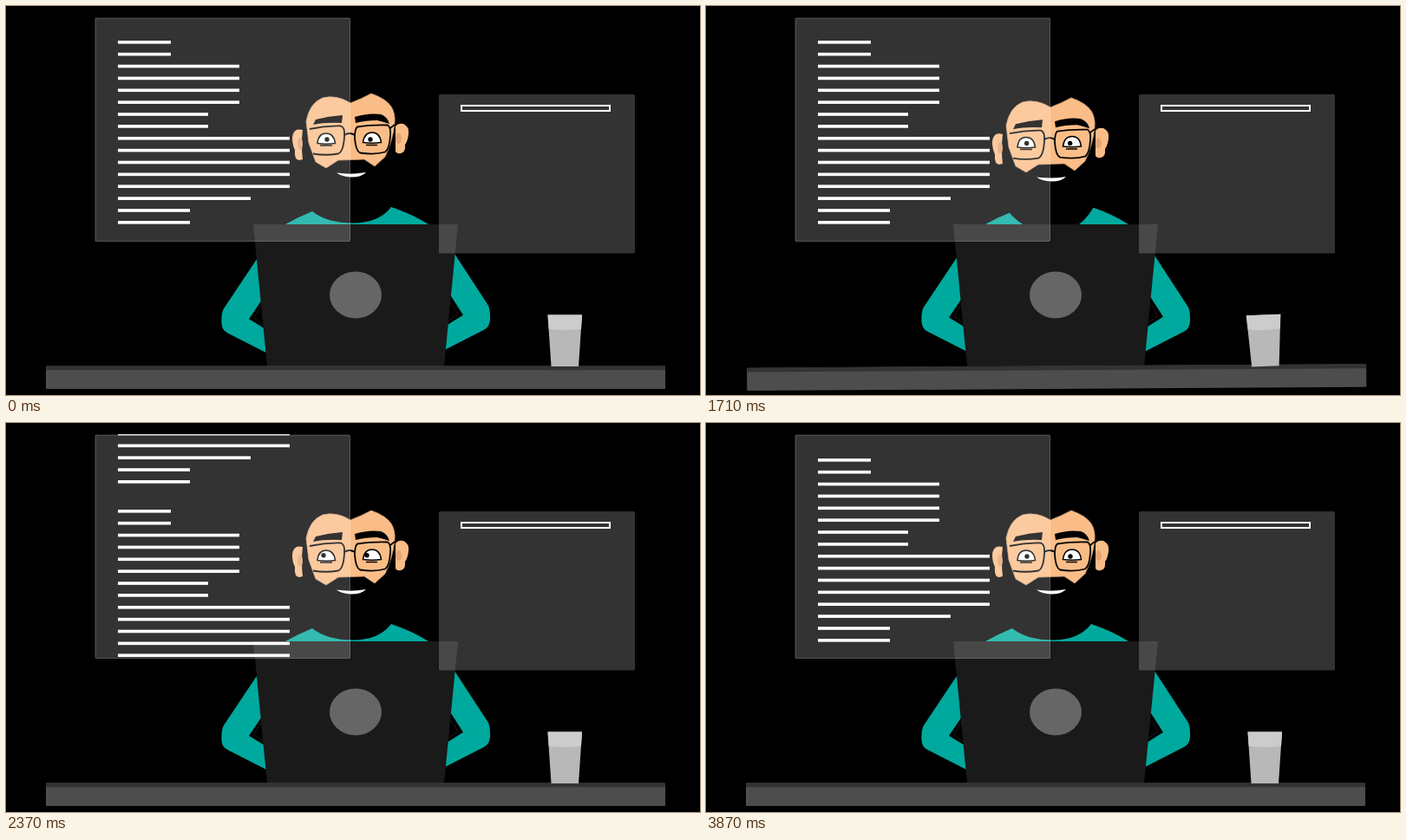
An HTML page that plays this animation: 800x449 px, repeating every 4.14 s.

```html
<!DOCTYPE html>
<html lang="en">
<head>
<meta charset="utf-8">
<title>Developer at work</title>
<style>
  html, body { margin: 0; width: 100%; height: 100%; overflow: hidden; background: #000; }
  svg { display: block; width: 100%; height: 100%; }
</style>
</head>
<body>
<svg viewBox="0 0 800 449">
  <defs>
    <clipPath id="codeClip"><rect x="102" y="13" width="295" height="259.5"/></clipPath>
  </defs>

  <path id="shirt" fill="#00a99d"/>

  <g id="leftArm">
    <path fill="#00a99d" d="M293 286L251 349Q248 354 248.500 366Q249 374 255 377L303 401.500V375L280 361L299 333Z"/>
    <path fill="none" stroke="#1a1a1a" d="M294 346L286 360L298 368"/>
  </g>
  <g id="rightArm">
    <path fill="#00a99d" d="M515 283L556 346Q558.500 352 558 363Q557 371 551 374L503 398.500V372L527 357L511 332Z"/>
    <path fill="none" stroke="#1a1a1a" d="M513 343L521 356L508 365"/>
  </g>

  <g id="head">
    <g fill="#fbbd87">
      <path d="M342 143Q331 140 330 152Q330 160 333 166Q332 178 338 178L342 177Q340 160 342 143Z"/>
      <path d="M449 139Q452 135 458 136Q465 139 464 148Q463 156 460 160Q461 169 455 170Q451 171 449 168Z"/>
      <path stroke="#c79a75" stroke-width=".8" d="M346 133Q350 112 365 106Q381 102 397 112Q410 107 421 101Q438 107 444 116Q449 124 448 135Q446 155 437 174L425 185L413 177L383 178L369 187L357 180L349 158Z"/>
    </g>
    <ellipse cx="339" cy="159" rx="3" ry="7" fill="#e5a474"/>
    <ellipse cx="452.500" cy="153" rx="3.500" ry="6" fill="#e5a474"/>
    <path fill="#fff" d="M381 192.500Q398 195 415 192Q410 197.500 398 197.500Q387 197 381 192.500Z"/>
  </g>

  <g id="glasses">
    <path d="M354 137L357 131Q372 127 388 126L387 135Q368 134 354 137Z"/>
    <path d="M402 128Q418 123 432 125Q440 128 442 136Q433 133 428 132Q414 132 403 135Z"/>
    <g fill="none" stroke="#000" stroke-width="1.800">
      <path d="M350 142Q368 138 386 138.500Q391 140 390 151Q389 168 383 170.500Q368 173 354 170.500"/>
      <path d="M405 139.500Q402 142 402 152Q403 167 408 169.500Q425 172 437 168.500Q442 165 443 150Q444 140 440 137.500Q420 137 405 139.500Z"/>
      <path d="M390 149Q396 145 402 149M443 141L448 137"/>
    </g>
  </g>

  <g id="eyes">
    <g fill="#fff" stroke="#000" stroke-width="1.500">
      <path d="M359 158.500Q360 147 369 147Q378 147 379.500 158.500Q369 160 359 158.500Z"/>
      <path d="M411.500 157.500Q413 146 422 146Q431 146 432.500 157.500Q422 159 411.500 157.500Z"/>
      <path d="M362 161H376M415 160.500H428"/>
    </g>
    <circle id="leftPupil" cy="154" r="2.700"/>
    <circle id="rightPupil" cy="154" r="2.700"/>
  </g>

  <path fill="#1a1a1a" d="M285 252H521L505 416H301Z"/>
  <ellipse cx="403" cy="333.500" rx="30" ry="27" fill="#666"/>

  <g id="desk">
    <rect x="46" y="415.500" width="714" height="26.500" rx="1" fill="#4d4d4d"/>
    <rect x="46" y="415.500" width="714" height="4.800" rx="1" fill="#333"/>
  </g>
  <g id="glass">
    <path fill="#b8b8b8" d="M624.500 356.500H664L660 416H628.500Z"/>
    <path fill="#ccc" d="M624.500 356.500H664L663 373Q644 375 625.700 373Z"/>
  </g>

  <g fill="#fff">
    <rect x="103" y="14" width="293.500" height="257.500" rx="1" fill-opacity=".2" stroke="#fff" stroke-opacity=".25"/>
    <rect x="499" y="102" width="226" height="183.500" rx="1.500" fill-opacity=".2"/>
  </g>
  <g clip-path="url(#codeClip)"><g id="code" fill="#fff"></g></g>
  <rect x="525" y="115" width="171" height="6" fill="none" stroke="#fff" stroke-width="2"/>
  <g id="page" fill="none" stroke="#fff" stroke-width="2"></g>
</svg>

<script>
const LOOP = 4140, STEP = 30, LAST = 3870;
const el = id => document.getElementById(id);
const move = (id, value) => el(id).setAttribute('transform', value);
const mix = (a, b, k) => a + (b - a) * k;
const ease = u => (1 - Math.cos(Math.PI * Math.min(1, Math.max(0, u)))) / 2;
const ramp = (t, from, to) => ease((t - from) / (to - from));

function track(t, keys) {
  const next = keys.findIndex(key => key[0] > t);
  if (next < 0) return keys[keys.length - 1][1];
  if (next === 0) return keys[0][1];
  const [t0, v0] = keys[next - 1], [t1, v1] = keys[next];
  return mix(v0, v1, ramp(t, t0, t1));
}

function add(parent, name, attrs) {
  const node = document.createElementNS('http://www.w3.org/2000/svg', name);
  for (const key in attrs) node.setAttribute(key, attrs[key]);
  return el(parent).appendChild(node);
}

// Code listing, repeated once so it can scroll through
const lineEnds = [190, 190, 269, 269, 269, 269, 233, 233, 327, 327, 327, 327, 327, 282, 212, 212];
for (const offset of [0, 242])
  lineEnds.forEach((end, i) => add('code', 'rect', {
    x: 129, y: 40 + offset + i * 13.87, width: end - 129, height: 3.6
  }));

// Page wireframe: boxes and text lines alternate sides, each grows from its left edge
const pageParts = [];
const rows = [{ top: 128, height: 43, lines: 4 }, { top: 183, height: 46, lines: 4 }, { top: 240, height: 32, lines: 3 }];
rows.forEach(({ top, height, lines }, row) => {
  const [boxX, textX] = row % 2 ? [621, 526] : [526, 621];
  pageParts.push({
    node: add('page', 'rect', { width: 75, height, rx: 0 }),
    x: boxX, y: top, start: 2790 + row * 27, end: 3660 - row * 60
  });
  for (let i = 0; i < lines; i++) pageParts.push({
    node: add('page', 'path', { d: `M0 0H${i === lines - 1 ? 48 : 74}`, 'stroke-width': 3 }),
    x: textX, y: top - 2 + i * 11.5, start: 2940 + row * 60 + i * 30, end: 3855 - row * 80 - i * 10
  });
});

const deskTilt = [[0, 0], [270, .5], [480, 0], [690, -.31], [870, 1], [1020, -.45], [1170, .5],
  [1350, 0], [1560, -.45], [1650, 0], [1800, -1], [2040, 0]];
const glassTilt = [[0, 0], [270, 1], [480, 0], [660, -2], [870, 2], [1080, -1], [1350, 0],
  [1800, -2.5], [2040, 0]];
const glassDrop = [[0, 0], [660, -.9], [900, 1], [1100, -1], [1350, 1.5], [1650, 0], [1920, 0]];
const gazeX = [[1650, 0], [1920, -3], [2370, -4], [2670, -4], [2880, 2.6], [3150, 4], [3600, 4], [3870, 0]];
const gazeY = [[1800, 0], [2370, -1.2], [2850, -1], [3150, 0]];

function draw(t) {
  const nod = ramp(t, 0, 480) - ramp(t, 1640, 1890);
  const look = ramp(t, 0, 540) - ramp(t, 1560, 1890);
  move('head', `translate(0 ${6 * nod})`);
  move('glasses', `translate(0 ${9 * look})`);
  move('eyes', `translate(0 ${8 * look})`);
  const gx = track(t, gazeX), gy = track(t, gazeY);
  el('leftPupil').setAttribute('cx', 370 + gx * (gx > 0 ? .5 : 1));
  el('rightPupil').setAttribute('cx', 420 + gx);
  el('leftPupil').setAttribute('cy', 154 + gy);
  el('rightPupil').setAttribute('cy', 154 + gy);

  const leftX = mix(353, 349, nod), leftY = mix(237, 239, nod);
  const rightX = mix(444, 447, nod), rightY = mix(232, 233, nod), neck = mix(250.5, 264, nod);
  el('shirt').setAttribute('d', `M322 252Q336 244 ${leftX} ${leftY}Q370 ${neck} 400 ${neck}` +
    `Q430 ${neck} ${rightX} ${rightY}Q468 240 487 252V268H322Z`);

  const typing = t < 2100 ? 3 * Math.cos(2 * Math.PI * (t - 660) / 126) : 0;
  move('leftArm', `translate(0 ${typing})`);
  move('rightArm', `translate(0 ${-1.2 * typing})`);
  move('desk', `rotate(${track(t, deskTilt)} 400 224.5)`);
  move('glass', `translate(0 ${track(t, glassDrop)}) rotate(${track(t, glassTilt)} 644 400)`);

  move('code', `translate(0 ${-241 * ramp(t, 1725, 2687)})`);
  for (const { node, x, y, start, end } of pageParts) {
    const grown = ramp(t, start, start + 330) - ramp(t, end - 270, end);
    node.setAttribute('transform', `translate(${x} ${y}) scale(${Math.max(grown, .0001)} 1)`);
    node.setAttribute('visibility', grown > .001 ? 'visible' : 'hidden');
  }
}

const began = performance.now();
function tick() {
  const t = (performance.now() - began) % LOOP;
  draw(Math.min(LAST, Math.floor(t / STEP) * STEP));
  requestAnimationFrame(tick);
}
tick();
</script>
</body>
</html>
```
